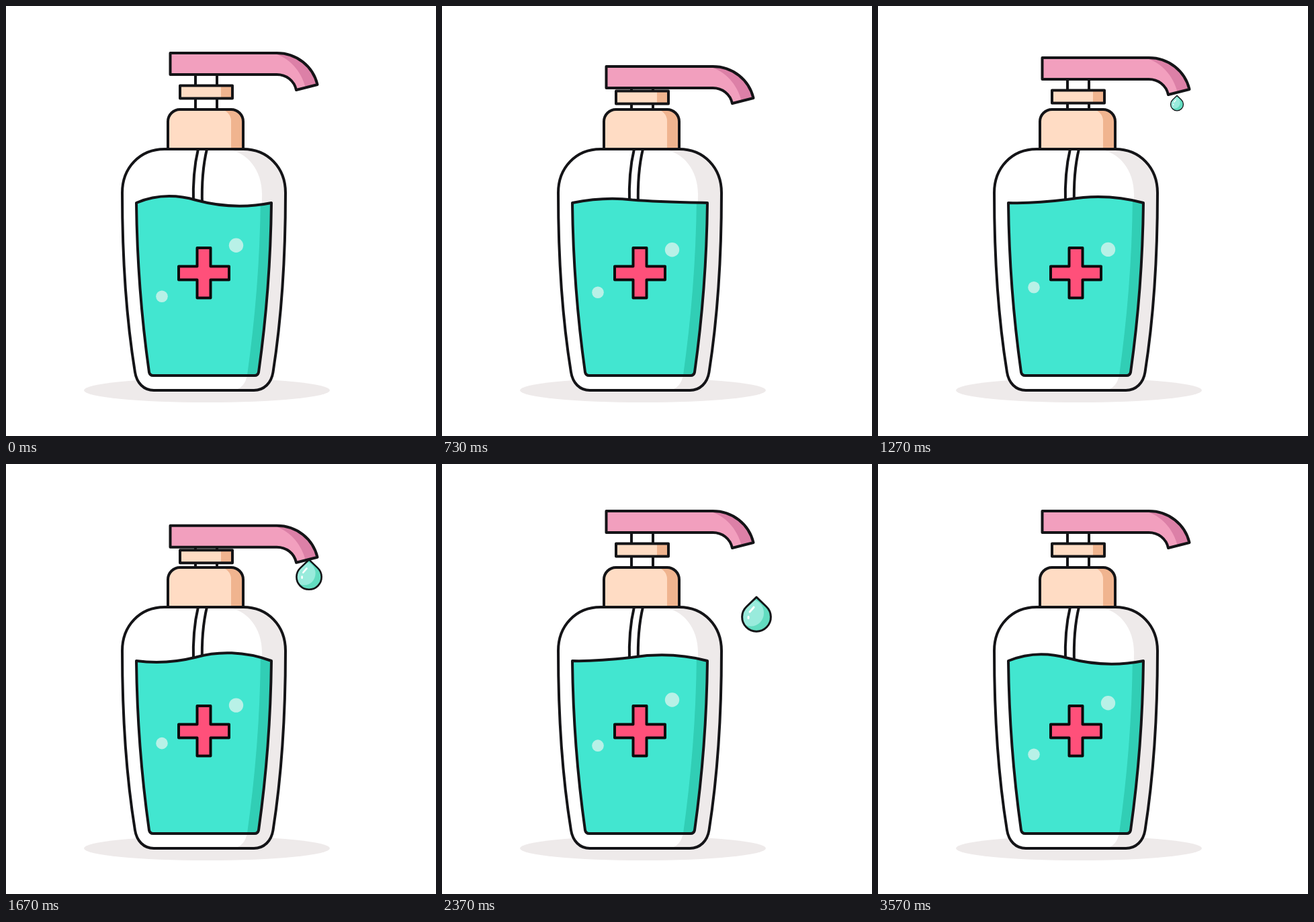
Recreate the animation shown at these times as an HTML page with a canvas. Size 640 by 640 pixels, loop 3610 ms.

```html
<!DOCTYPE html>
<html lang="en">
<head>
<meta charset="utf-8">
<title>Pump bottle</title>
<style>
  html, body { margin: 0; width: 100%; height: 100%; overflow: hidden; background: #fff; }
  canvas { display: block; width: 640px; height: 640px; }
</style>
</head>
<body>
<canvas id="stage" width="640" height="640"></canvas>
<script>
const ctx = document.getElementById('stage').getContext('2d');
const LOOP = 3610;
const INK = '#141417';

// Smooth monotone curve through [time, value] keys.
function track(keys) {
  const slope = i => (keys[i + 1][1] - keys[i][1]) / (keys[i + 1][0] - keys[i][0]);
  const tangent = keys.map((_, i) => {
    if (i === 0) return slope(0);
    if (i === keys.length - 1) return slope(i - 1);
    const a = slope(i - 1), b = slope(i);
    return a * b <= 0 ? 0 : 2 * a * b / (a + b);
  });
  return t => {
    if (t <= keys[0][0]) return keys[0][1];
    let i = 0;
    while (i < keys.length - 1 && t > keys[i + 1][0]) i++;
    if (i === keys.length - 1) return keys[i][1];
    const [t0, v0] = keys[i], [t1, v1] = keys[i + 1];
    const span = t1 - t0, u = (t - t0) / span, w = 1 - u;
    return v0 * w * w * (1 + 2 * u) + v1 * u * u * (3 - 2 * u)
      + span * u * w * (tangent[i] * w - tangent[i + 1] * u);
  };
}

const collarDrop = track([[0, 0], [180, 7], [450, 10], [570, 9.7], [730, 8], [1110, 3.6],
  [1270, 7], [1500, 10], [1670, 9.7], [2180, 0], [LOOP, 0]]);
const headPress = track([[0, 0], [200, 0], [560, 12], [740, 12], [1060, 0], [1270, 0],
  [1640, 12], [1760, 12], [2130, 0], [LOOP, 0]]);
const dropX = track([[1100, 443], [1270, 445], [1670, 451], [2170, 463], [2370, 468], [2770, 479], [3200, 487]]);
const dropY = track([[1100, 139], [1270, 144.5], [1670, 164.5], [2170, 202], [2370, 223.5],
  [2670, 284], [2770, 312.5], [3200, 444]]);
const dropScale = track([[1100, 0], [1270, 0.44], [1670, 0.87], [2170, 1.18], [2370, 1], [2770, 0.46], [3200, 0]]);

const bottle = new Path2D('M236 213H353C390 213 416 241 416 278C416 370 410 465 397.5 545' +
  'C395 561 384 572 369 572H220C205 572 194.500 561 192 545C179 465 173 370 173 278C173 241 199 213 236 213Z');
const bottleShade = new Path2D('M328 213C360 217 381 245 381 280C380 380 372 470 359 548' +
  'C357 562 350 570 338 572V600H440V213Z');
const liquidShade = new Path2D('M379 270C379 372 371 465 358.500 553H420V270Z');
const tube = new Path2D('M286 213C280 238 278 262 279 294M299 213C293 238 291 262 292 296');
const cap = new Path2D('M241 213V172A18 18 0 0 1 259 154H335A18 18 0 0 1 353 172V213Z');
const capShade = new Path2D('M318 154A17 17 0 0 1 335 171V213H360V154Z');
const collar = new Path2D('M259 118.500H337V137.500H259Z');
const collarShade = new Path2D('M320 118H340V140H320Z');
const head = new Path2D('M244.500 70H403C433 70 457 90 463.500 117L432 125C429 111 417 102 403 102H244.500Z');
const headShade = new Path2D('M394 69C420 75 439 95 446 122L470 118V69Z');
const cross = new Path2D('M284.500 360H304.500V387.500H332V407.500H304.500V434.500H284.500V407.500H257V387.500H284.500Z');
const droplet = new Path2D('M0 -25.500L-14.700 -11.400A21.400 21.400 0 1 0 14.700 -11.400Z');

function fill(path, color) {
  ctx.fillStyle = color;
  ctx.fill(path);
}

function stroke(path, width = 4, color = INK) {
  ctx.lineWidth = width;
  ctx.strokeStyle = color;
  ctx.stroke(path);
}

function oval(x, y, rx, ry, color) {
  ctx.beginPath();
  ctx.ellipse(x, y, rx, ry, 0, 0, Math.PI * 2);
  ctx.fillStyle = color;
  ctx.fill();
}

function shaded(path, color, shade, shadeColor) {
  fill(path, color);
  ctx.save();
  ctx.clip(path);
  fill(shade, shadeColor);
  ctx.restore();
}

function part(path, color, shade, shadeColor) {
  shaded(path, color, shade, shadeColor);
  stroke(path);
}

function shifted(dy, draw) {
  ctx.save();
  ctx.translate(0, dy);
  draw();
  ctx.restore();
}

function liquidPath(w) {
  const mix = (a, b) => a + (b - a) * w;
  const p = new Path2D();
  p.moveTo(194, 293);
  p.bezierCurveTo(mix(225, 230), mix(280, 298), mix(255, 262), mix(281, 293), 283, mix(289, 287.5));
  p.bezierCurveTo(mix(320, 315), mix(299, 278), mix(360, 355), mix(300, 278), 395, 293);
  p.bezierCurveTo(394, 380, 387, 467, 376, 545);
  p.quadraticCurveTo(375, 550, 370, 550);
  p.lineTo(219, 550);
  p.quadraticCurveTo(214, 550, 213, 545);
  p.bezierCurveTo(202, 467, 195, 380, 194, 293);
  p.closePath();
  return p;
}

function drawDroplet(t) {
  const scale = dropScale(t);
  if (scale <= 0.01) return;
  ctx.save();
  ctx.translate(dropX(t), dropY(t));
  ctx.scale(scale, scale);
  fill(droplet, '#62dcc0');
  ctx.save();
  ctx.clip(droplet);
  oval(-8, -2, 19, 20, '#99ebdc');
  ctx.restore();
  stroke(new Path2D('M-10 -3.500L-4 -10.500M-12 3.500V6'), 3, '#fff');
  stroke(droplet, 3);
  ctx.restore();
}

function draw(t) {
  const angle = t / LOOP * Math.PI * 2;
  const sway = (1 - Math.cos(angle)) / 2;
  const sink = collarDrop(t);

  ctx.fillStyle = '#fff';
  ctx.fillRect(0, 0, 640, 640);
  oval(299, 572, 183, 18, '#eeeaea');

  shaded(bottle, '#fff', bottleShade, '#eeeaea');
  stroke(tube);
  part(liquidPath(sway), '#42e6d0', liquidShade, '#31ceb5');
  stroke(bottle);
  oval(342.5, 356.2 + 7 * Math.sin(angle - 0.2 * sway), 10.7, 10.7, '#b8f1e7');
  oval(232, 432.2 - 16.8 * sway, 8.8, 8.8, '#b8f1e7');
  fill(cross, '#ff507a');
  stroke(cross, 4, '#0c090b');

  drawDroplet(t);
  stroke(new Path2D(`M282 ${100 + sink}V154M314 ${100 + sink}V154`));
  part(cap, '#ffdcc4', capShade, '#f0b48f');
  shifted(sink, () => part(collar, '#ffdcc4', collarShade, '#f0b48f'));
  shifted(sink + headPress(t), () => part(head, '#f29fbe', headShade, '#dc80a7'));
}

ctx.lineJoin = 'round';
ctx.lineCap = 'round';

function tick() {
  draw(performance.now() % LOOP);
  requestAnimationFrame(tick);
}
tick();
</script>
</body>
</html>
```
